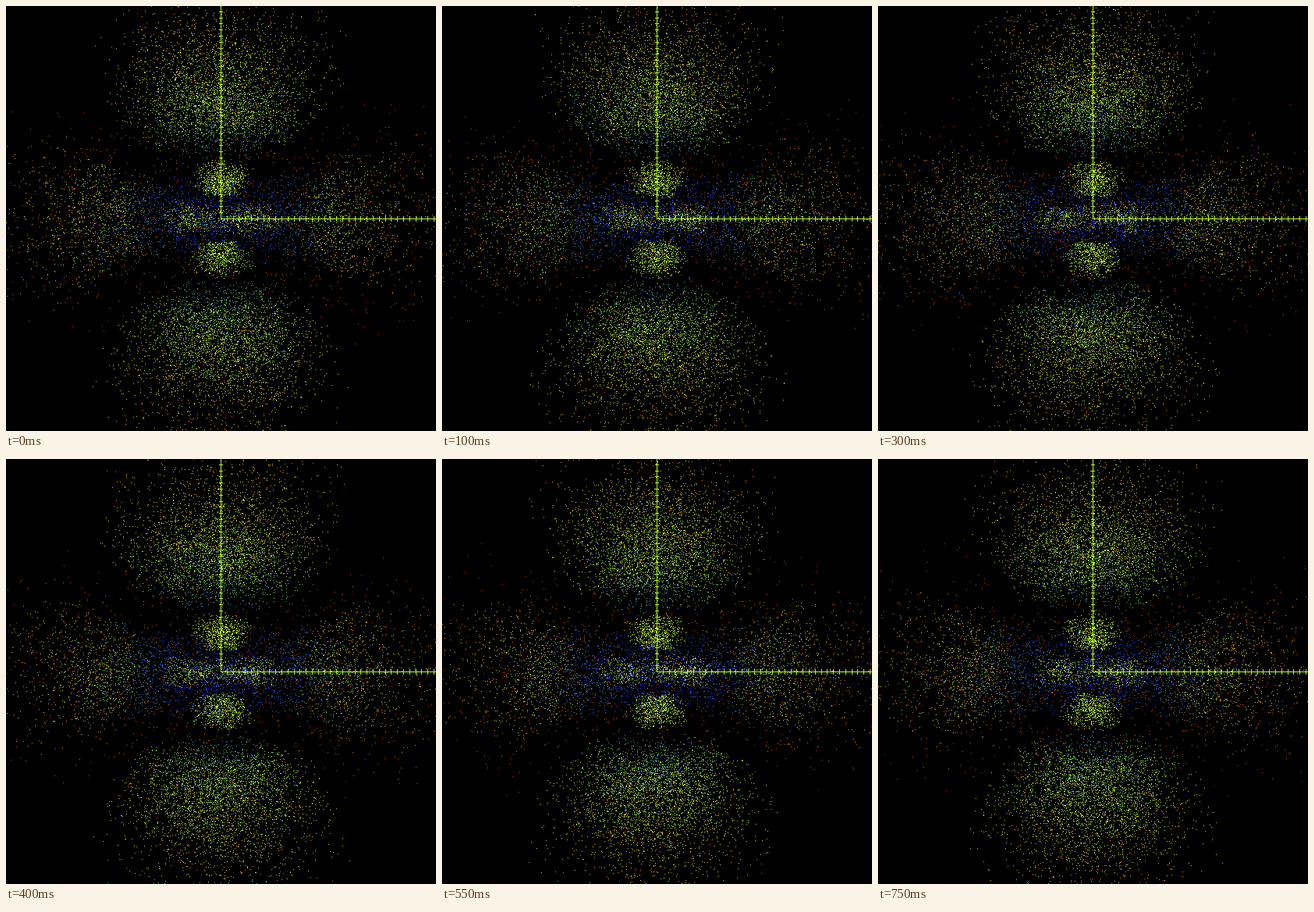
Write an HTML page with a canvas that moves like this. It is 551 px wide and 544 px high and loops after 0.8 s.

```html
<!DOCTYPE html>
<html lang="en">
<head>
<meta charset="utf-8">
<title>Electron cloud</title>
<style>
  html, body { margin: 0; width: 100%; height: 100%; overflow: hidden; background: #000; }
  canvas { display: block; }
</style>
</head>
<body>
<canvas id="stage" width="551" height="544"></canvas>
<script>
const W = 551, H = 544, CX = 275, CY = 272;
const STEPS = 16, STEP_MS = 50;
const POINTS = 14000;
const UNIT = 7.8;      // pixels per Bohr radius at the origin
const CAMERA = 46;     // camera distance in Bohr radii
const MAX_R = 46;
const CUTOFF = 250;    // thinner parts of the cloud stay empty
const AXIS = '#b8fa20';
const ctx = document.getElementById('stage').getContext('2d');

// Depth towards the viewer, then red, green, blue.
const RAMP = [
  [-22, 30, 50, 255], [-12, 56, 132, 190], [-5, 124, 206, 84], [0, 186, 248, 46],
  [6, 226, 204, 40], [13, 226, 126, 28], [22, 200, 62, 14]
];

function seeded(seed) {
  return () => {
    seed = (seed + 0x6D2B79F5) | 0;
    let t = Math.imul(seed ^ (seed >>> 15), 1 | seed);
    t = (t + Math.imul(t ^ (t >>> 7), 61 | t)) ^ t;
    return ((t ^ (t >>> 14)) >>> 0) / 4294967296;
  };
}

function depthColor(depth) {
  const d = Math.max(-22, Math.min(21.99, depth));
  const i = RAMP.findIndex(stop => stop[0] > d);
  const a = RAMP[i - 1], b = RAMP[i];
  const k = (d - a[0]) / (b[0] - a[0]);
  return [1, 2, 3].map(c => a[c] + (b[c] - a[c]) * k);
}

// Hydrogen 4d orbital, m = 0.
const radial = r => r ** 6 * (1 - r / 12) ** 2 * Math.exp(-r / 2);
const angular = c => (3 * c * c - 1) ** 2;

function sample(random, density, low, high, peak) {
  let v;
  do v = low + (high - low) * random();
  while (random() * peak > density(v));
  return v;
}

function samplePoint(random) {
  let r, c;
  do {
    r = sample(random, radial, 0, MAX_R, 1350);
    c = sample(random, angular, -1, 1, 4);
  } while (radial(r) * Math.min(1, angular(c)) < CUTOFF);
  return [r, c, random() * Math.PI * 2];
}

function makeCloud(seed) {
  const random = seeded(seed);
  const image = new ImageData(W, H);
  const data = image.data;
  for (let i = 3; i < data.length; i += 4) data[i] = 255;

  for (let n = 0; n < POINTS; n++) {
    const [r, c, phi] = samplePoint(random);
    const rho = r * Math.sqrt(1 - c * c);
    const depth = rho * Math.sin(phi);
    const zoom = UNIT * CAMERA / (CAMERA - depth);
    const x = Math.round(CX + rho * Math.cos(phi) * zoom);
    const y = Math.round(CY - r * c * zoom);
    if (depth >= CAMERA || x < 0 || x >= W || y < 0 || y >= H) continue;
    data.set(depthColor(depth), (y * W + x) * 4);
  }
  return image;
}

function drawAxes() {
  ctx.fillStyle = AXIS;
  ctx.fillRect(CX, CY, W - CX, 1);
  ctx.fillRect(CX, 0, 1, CY + 1);
  for (let d = UNIT; d < W - CX; d += UNIT) {
    ctx.fillRect(Math.round(CX + d), CY - 3, 1, 7);
    ctx.fillRect(CX - 2, Math.round(CY - d), 5, 1);
  }
}

const clouds = Array.from({ length: STEPS }, (_, i) => makeCloud(71 + i * 977));
const start = performance.now();
let shown = -1;

function render(now) {
  const step = Math.floor(Math.max(0, now - start) / STEP_MS) % STEPS;
  if (step !== shown) {
    ctx.putImageData(clouds[step], 0, 0);
    drawAxes();
    shown = step;
  }
  requestAnimationFrame(render);
}
render(start);
</script>
</body>
</html>
```
